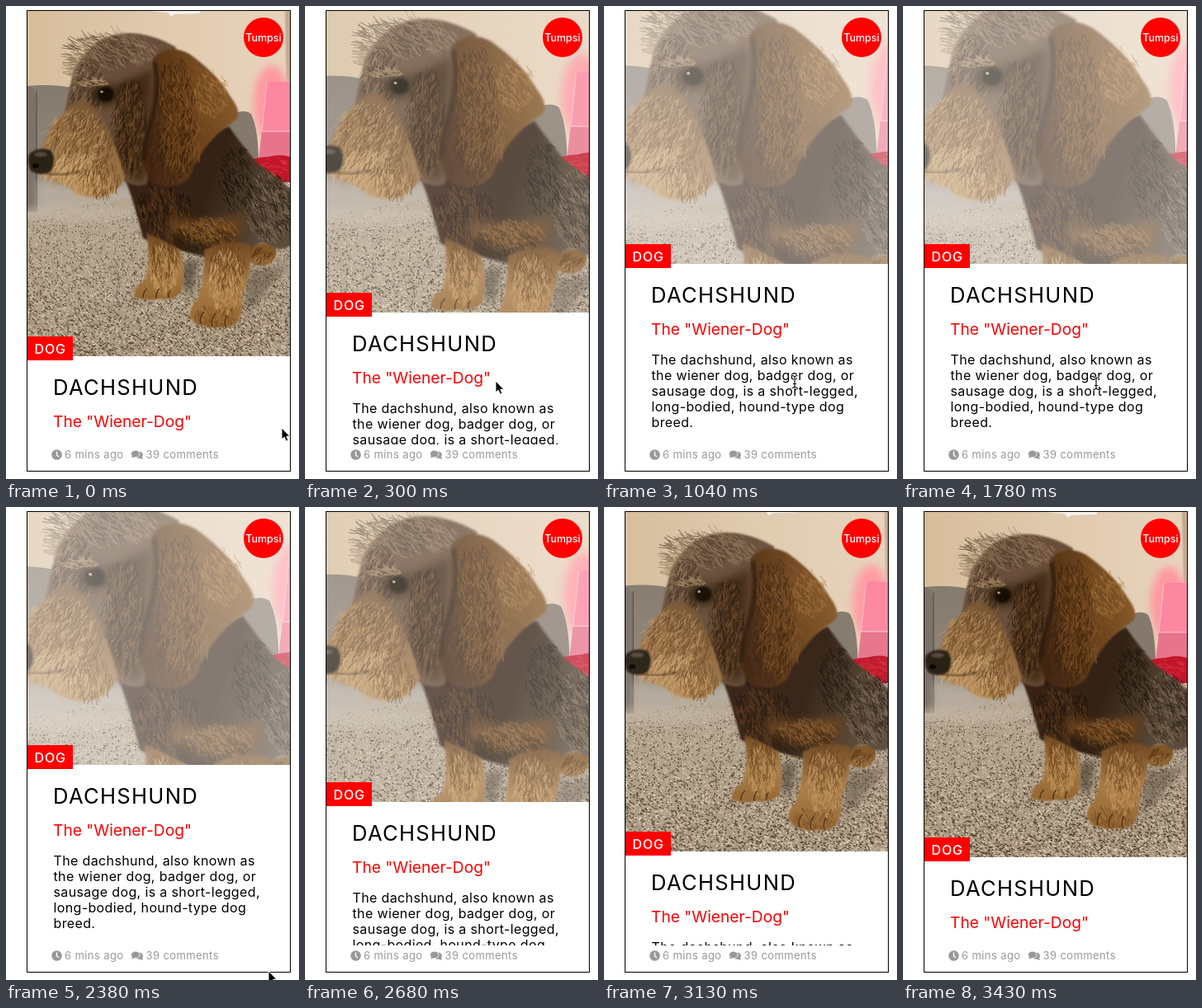
An HTML page for the animation above (4.16 s loop, 355 by 574 pixels).

```html
<!DOCTYPE html>
<html lang="en">
<head>
<meta charset="utf-8">
<title>Dog card</title>
<style>
  html, body { margin: 0; width: 100%; height: 100%; overflow: hidden; background: #fff; }
  svg { display: block; width: 355px; height: 574px; }
  text { font-family: Montserrat, Inter, sans-serif; }
  .title { font-size: 25.6px; letter-spacing: 1.3px; }
  .sub { font-size: 19.2px; fill: #f00; }
  .para { font-size: 16px; letter-spacing: .36px; }
  .meta { font-size: 13px; letter-spacing: .4px; fill: #999; }
  .tag { font-size: 16px; letter-spacing: .9px; fill: #fff; font-weight: 500; }
  .badge { font-size: 12.5px; fill: #fff; font-weight: 500; text-anchor: middle; }
</style>
</head>
<body>
<svg viewBox="0 0 355 574" xmlns="http://www.w3.org/2000/svg">
  <defs>
    <clipPath id="frame"><rect id="frameBox" x="26" y="6" width="318" height="419"/></clipPath>
    <clipPath id="textArea"><rect x="26" y="6" width="318" height="526"/></clipPath>
    <clipPath id="seatClip"><path d="M26 256Q80 240 150 234L344 286V425H26Z"/></clipPath>
    <filter id="soft" x="-40%" y="-40%" width="180%" height="180%"><feGaussianBlur stdDeviation="5"/></filter>
    <filter id="edge" x="-10%" y="-10%" width="120%" height="120%"><feGaussianBlur stdDeviation="1.3"/></filter>
    <linearGradient id="wall" x2="1" y2="0">
      <stop offset="0" stop-color="#d6bd9b"/><stop offset=".5" stop-color="#dfcaae"/><stop offset="1" stop-color="#e8d3bd"/>
    </linearGradient>
    <linearGradient id="sofa" x2="0" y2="1">
      <stop offset="0" stop-color="#857a6e"/><stop offset=".55" stop-color="#8f8478"/><stop offset="1" stop-color="#b3a89b"/>
    </linearGradient>
    <linearGradient id="seat" x2=".2" y2="1">
      <stop offset="0" stop-color="#b5a691"/><stop offset="1" stop-color="#a8967e"/>
    </linearGradient>
    <linearGradient id="ear" x1="0" y1=".6" x2="1" y2=".3">
      <stop offset="0" stop-color="#432711"/><stop offset=".5" stop-color="#67401b"/><stop offset="1" stop-color="#8a5c2b"/>
    </linearGradient>
    <linearGradient id="body" x2="1" y2=".3">
      <stop offset="0" stop-color="#3a2411"/><stop offset=".6" stop-color="#342416"/><stop offset="1" stop-color="#5c4c3b"/>
    </linearGradient>
    <linearGradient id="leg" x2="0" y2="1">
      <stop offset="0" stop-color="#704820"/><stop offset=".5" stop-color="#a97b46"/><stop offset="1" stop-color="#936530"/>
    </linearGradient>
    <linearGradient id="muzzle" x1=".8" y1="0" x2=".4" y2="1">
      <stop offset="0" stop-color="#6d4f31"/><stop offset=".5" stop-color="#946c41"/><stop offset="1" stop-color="#b08655"/>
    </linearGradient>
  </defs>

  <rect width="355" height="574" fill="#fff"/>
  <g clip-path="url(#frame)"><g id="photo"></g></g>

  <g clip-path="url(#textArea)">
    <g id="copy">
      <text class="title" x="57" y="471.5">DACHSHUND</text>
      <text class="sub" x="57" y="511">The "Wiener-Dog"</text>
      <g id="para" class="para"></g>
    </g>
  </g>
  <g id="tag">
    <rect x="26" y="401" width="55" height="29" fill="#f00"/>
    <text class="tag" x="34.5" y="421.5">DOG</text>
  </g>

  <circle cx="312" cy="38" r="24" fill="#f00"/>
  <text class="badge" x="312" y="43">Tumpsi</text>

  <g fill="#999">
    <circle cx="61.5" cy="544.5" r="6.3"/>
    <path d="M61.5 540.5V545L64 547" fill="none" stroke="#fff" stroke-width="1.4"/>
    <path d="M156 544.5a5 4 0 1 1 9 2.5l1 3-4-1.3q-5 .5-6-4.200z"/>
    <path d="M151.500 549l1-3a5.300 4.300 0 1 1 3.500 1.700z" stroke="#fff" stroke-width=".8"/>
    <text class="meta" x="71" y="549">6 mins ago</text>
    <text class="meta" x="169.500" y="549">39 comments</text>
  </g>

  <rect x="25.5" y="5.500" width="319" height="559" fill="none" stroke="#000"/>

  <path id="arrow" d="M0 0V14L3.200 11.200 5.500 16.200 8 15.100 5.800 10.300H10Z" fill="#000" stroke="#fff" stroke-width="1"/>
  <g id="beam" fill="none">
    <path d="M-3.500-7.500Q0-7.500 0-5V5Q0 7.500-3.500 7.500M3.500-7.500Q0-7.500 0-5V5Q0 7.500 3.500 7.500M-2 2.500H2" stroke="#fff" stroke-width="2.600"/>
    <path d="M-3.500-7.500Q0-7.500 0-5V5Q0 7.500-3.500 7.500M3.500-7.500Q0-7.500 0-5V5Q0 7.500 3.500 7.500M-2 2.500H2" stroke="#000" stroke-width="1.100"/>
  </g>
</svg>

<script>
const $ = id => document.getElementById(id);

// Seeded generator, so fur and weave are the same on each load
let seed = 7;
const rnd = () => (seed = (seed * 16807) % 2147483647) / 2147483647;

const parts = [];
const shape = (d, fill, extra = '') => parts.push(`<path d="${d}" fill="${fill}" ${extra}/>`);
const blob = (x, y, rx, ry, fill, extra = '') =>
  parts.push(`<ellipse cx="${x}" cy="${y}" rx="${rx}" ry="${ry}" fill="${fill}" ${extra}/>`);
const soft = 'filter="url(#soft)"', edge = 'filter="url(#edge)"';

// Hairs scattered over an ellipse, all lying near one angle
function fur(x, y, rx, ry, deg, len, n, color, width = 1) {
  let d = '';
  for (let i = 0; i < n; i++) {
    const r = Math.sqrt(rnd()), a = rnd() * Math.PI * 2;
    const dir = (deg + (rnd() - .5) * 55) * Math.PI / 180;
    const l = len * (.4 + rnd() * .7);
    d += `M${(x + rx * r * Math.cos(a)).toFixed(1)} ${(y + ry * r * Math.sin(a)).toFixed(1)}` +
         `l${(l * Math.cos(dir)).toFixed(1)} ${(l * Math.sin(dir)).toFixed(1)}`;
  }
  shape(d, 'none', `stroke="${color}" stroke-width="${width}" stroke-linecap="round" opacity=".6"`);
}

// Woven cloth: short dashes, larger and denser towards the viewer
function weave(color, n) {
  let d = '';
  for (let i = 0; i < n; i++) {
    const near = rnd() ** .7, k = .8 + near * 1.5;
    d += `M${(26 + rnd() * 318).toFixed(1)} ${(232 + near * 193).toFixed(1)}` +
         `l${k.toFixed(1)} ${(k * (rnd() < .7 ? .7 : -.5)).toFixed(1)}`;
  }
  shape(d, 'none', `stroke="${color}" stroke-width="1" clip-path="url(#seatClip)"`);
}

function drawRoom() {
  shape('M26 6H344V425H26Z', 'url(#wall)');
  shape('M172 6H236L234 9 204 10 200 13 196 8Z', '#f6f1ea');
  shape('M338 6H344V92H340Z', '#c3a48c', edge);
  blob(322, 118, 22, 46, '#ff9aa0', soft);
  shape('M316 92H344V152H310Z', '#fb87a0');
  shape('M310 152H344V187H306Z', '#e8748c');
  shape('M316 92L310 152H344', 'none', 'stroke="#ffb0bf" stroke-width="1.500"');

  shape('M26 97Q60 94 82 100L160 130V262H26Z', 'url(#sofa)');
  shape('M26 98Q36 98 37 112L38 250H26Z', '#7d7267');
  shape('M37 104V250', 'none', 'stroke="#5a5046" stroke-width="1.200"');
  shape('M38 212Q90 230 156 216V255H38Z', '#b5aa9d', soft);
  shape('M262 138Q285 122 297 131Q306 150 306 190H262Z', '#85796d');
  shape('M286 190Q300 184 318 183Q332 179 344 183V214Q324 214 306 206Z', '#c0182a');
  fur(322, 195, 18, 11, 15, 6, 45, '#ea3a4a');

  shape('M26 256Q80 240 150 234L344 286V425H26Z', 'url(#seat)');
  weave('#4a3c2c', 4600);
  weave('#e0d0b8', 3200);
  blob(80, 252, 75, 9, '#c4b7a5', soft + ' opacity=".7"');
  shape('M212 312L234 306 226 350 214 342Z', '#4c3f32', soft + ' opacity=".7"');
  shape('M292 318Q320 326 344 308L338 318 288 380Z', '#54463a', soft + ' opacity=".5"');
}

function drawBody() {
  shape('M296 292Q312 284 326 292Q332 306 314 315Q298 316 294 306Z', '#815628', edge);
  fur(311, 301, 13, 9, 120, 6, 60, '#4d3016');
  fur(312, 306, 12, 6, 120, 5, 35, '#b58a54');
  shape('M143 206Q160 190 270 146Q284 166 302 188Q328 208 346 222V290Q330 300 316 288Q298 284 292 310L240 304Q204 296 166 282Q158 246 143 206Z', 'url(#body)', edge);
  fur(316, 242, 28, 42, 50, 9, 260, '#85725b');
  fur(318, 240, 28, 42, 55, 9, 200, '#1f150c');
  fur(278, 208, 20, 42, 60, 9, 150, '#150d06');
  fur(190, 250, 32, 34, 70, 9, 200, '#6b431d');
  fur(190, 240, 34, 30, 75, 9, 160, '#1a0f06');
  shape('M196 256Q240 266 288 252Q290 274 272 290Q226 290 196 272Z', '#65401a', soft);
  fur(244, 270, 34, 16, 55, 9, 190, '#946432');
  fur(236, 280, 38, 16, 40, 9, 150, '#2a1909');

  shape('M170 276Q192 284 211 296Q217 318 213 344Q208 358 186 355Q172 359 157 354Q151 344 168 333Q176 310 170 276Z', 'url(#leg)', edge);
  fur(191, 316, 17, 30, 85, 8, 170, '#c99d63');
  fur(191, 304, 17, 26, 85, 8, 110, '#5c3b18');
  shape('M240 296Q272 280 297 290Q298 324 286 352Q288 382 272 389Q244 394 228 384Q216 372 232 356Q242 326 240 296Z', 'url(#leg)', edge);
  fur(266, 332, 21, 38, 95, 8, 260, '#cda26a');
  fur(268, 312, 22, 28, 95, 8, 130, '#5f3d19');
  fur(254, 374, 26, 14, 90, 6, 80, '#6d471f');
  shape('M166 354Q166 347 171 343M182 355Q181 348 186 343M197 354Q196 348 199 345M236 386Q234 377 240 371M250 389Q248 379 254 373M266 389Q264 381 268 375',
    'none', 'stroke="#4d301a" stroke-width="1.400"');
}

function drawHead() {
  // Skull and cheek
  shape('M82 78Q96 50 122 38Q160 24 206 50L190 130 170 216Q152 222 136 206L96 176 68 146Q74 112 82 78Z', '#69503a', edge);
  fur(120, 56, 42, 20, 205, 13, 190, '#4c3b2a');
  fur(134, 56, 52, 22, 220, 11, 220, '#9b8161');
  fur(86, 74, 11, 14, 200, 13, 60, '#8f7759');
  shape('M130 96Q160 84 178 76L168 212Q150 214 136 196Q128 160 138 130Z', '#432b16', soft);
  fur(150, 146, 20, 60, 105, 10, 260, '#75502c');
  fur(150, 140, 22, 58, 105, 10, 180, '#22140a');
  fur(100, 98, 20, 30, 115, 8, 130, '#36261a');
  fur(104, 96, 22, 30, 115, 8, 90, '#a2835c');

  // Muzzle and beard
  shape('M88 114Q66 128 52 154Q40 172 42 204Q56 214 74 218Q94 236 118 232Q136 226 144 208Q136 176 122 146Q106 112 88 114Z', 'url(#muzzle)', edge);
  fur(86, 160, 36, 36, 125, 10, 260, '#c39a64');
  fur(94, 166, 38, 40, 120, 10, 240, '#5c3f22');
  fur(82, 196, 40, 18, 120, 11, 220, '#d3ae7a');
  fur(108, 216, 26, 14, 100, 10, 120, '#c69d67');
  fur(116, 206, 24, 22, 100, 10, 110, '#6a4520');
  shape('M46 202Q66 208 90 200', 'none', 'stroke="#3d2816" stroke-width="3" opacity=".5" ' + edge);

  // Nose
  shape('M28 180Q38 170 54 175Q62 186 55 200Q42 208 30 200Q25 190 28 180Z', '#2b2019', edge);
  blob(42, 180, 8, 3, '#6a5b50', 'opacity=".7" ' + edge);
  blob(36, 194, 4, 3, '#0c0806');

  // Eye
  blob(119, 108, 17, 13, '#30200f', soft);
  blob(121, 107, 10, 9, '#140c06', edge);
  blob(116, 104, 1.8, 1.6, '#a89a88');
  fur(108, 94, 18, 5, 200, 9, 50, '#b0926a');
}

function drawEar() {
  shape('M178 64Q196 44 222 58Q256 82 272 110Q286 128 279 138Q258 152 248 164Q232 182 222 208Q204 226 180 216Q162 202 165 166Q178 134 178 64Z', 'url(#ear)', edge);
  fur(222, 112, 40, 42, 65, 10, 260, '#845626');
  fur(204, 130, 26, 70, 85, 10, 240, '#341d0a');
  fur(200, 176, 28, 36, 100, 10, 160, '#3a210c');
  fur(214, 165, 24, 36, 110, 10, 130, '#855726');
  shape('M180 68Q188 100 176 140Q168 166 166 188', 'none', `stroke="#20120a" stroke-width="5" opacity=".6" ${edge}`);
  fur(248, 104, 20, 28, 55, 8, 110, '#a87a40');
}

const LINES = ['The dachshund, also known as', 'the wiener dog, badger dog, or',
  'sausage dog, is a short-legged,', 'long-bodied, hound-type dog', 'breed.'];
$('para').innerHTML = LINES.map((s, i) => `<text x="57.5" y="${547 + 19 * i}">${s}</text>`).join('');

drawRoom();
drawBody();
drawHead();
drawEar();
$('photo').innerHTML = parts.join('');

const LOOP = 4160, SPAN = 1000, ENTER = 20, LEAVE = 2432;
const STEPS = [0, 150, 300, 450, 590, 740, 890, 1040, 1780, 1930, 2080, 2230, 2380,
  2530, 2680, 2830, 2980, 3130, 3280, 3430];
// Pointer: start time, x, y, kind
const POINTER = [[0, 334, 512, 'arrow'], [150, 283, 484, 'arrow'], [300, 231, 455, 'arrow'],
  [450, 231, 456, 'beam'], [1780, 234, 458, 'beam'], [1930, 244, 468, 'beam'],
  [2080, 248, 475, 'beam'], [2230, 292, 525, 'arrow'], [2380, 318, 563, 'arrow'], [2530, 0, 0, '']];

// Standard CSS "ease" curve
function ease(x) {
  if (x <= 0) return 0;
  if (x >= 1) return 1;
  let lo = 0, hi = 1;
  for (let i = 0; i < 24; i++) {
    const s = (lo + hi) / 2;
    if (.75 * s - .75 * s * s + s ** 3 < x) lo = s; else hi = s;
  }
  return .3 * lo * (1 - lo) ** 2 + 3 * lo * lo * (1 - lo) + lo ** 3;
}

function draw(t) {
  const open = t < LEAVE ? ease((t - ENTER) / SPAN) : 1 - ease((t - LEAVE) / SPAN);
  const rise = Math.min(112, Math.round(113 * open));
  const scale = 1 + .2 * open;

  $('frameBox').setAttribute('height', 419 - rise);
  $('photo').setAttribute('transform', `translate(185 215.5) scale(${scale}) translate(-185 -215.5)`);
  $('photo').setAttribute('opacity', 1 - .4 * open);
  $('copy').setAttribute('transform', `translate(0 ${-rise})`);
  $('tag').setAttribute('transform', `translate(0 ${-rise})`);

  const [, x, y, kind] = POINTER.filter(p => p[0] <= t).pop();
  for (const id of ['arrow', 'beam']) {
    $(id).setAttribute('visibility', id === kind ? 'visible' : 'hidden');
    $(id).setAttribute('transform', `translate(${x} ${y})`);
  }
}

const begin = performance.now();
let shown = -1;
function tick() {
  const t = (performance.now() - begin) % LOOP;
  const step = STEPS.filter(s => s <= t).pop();
  if (step !== shown) draw(shown = step);
  requestAnimationFrame(tick);
}
tick();
</script>
</body>
</html>
```
